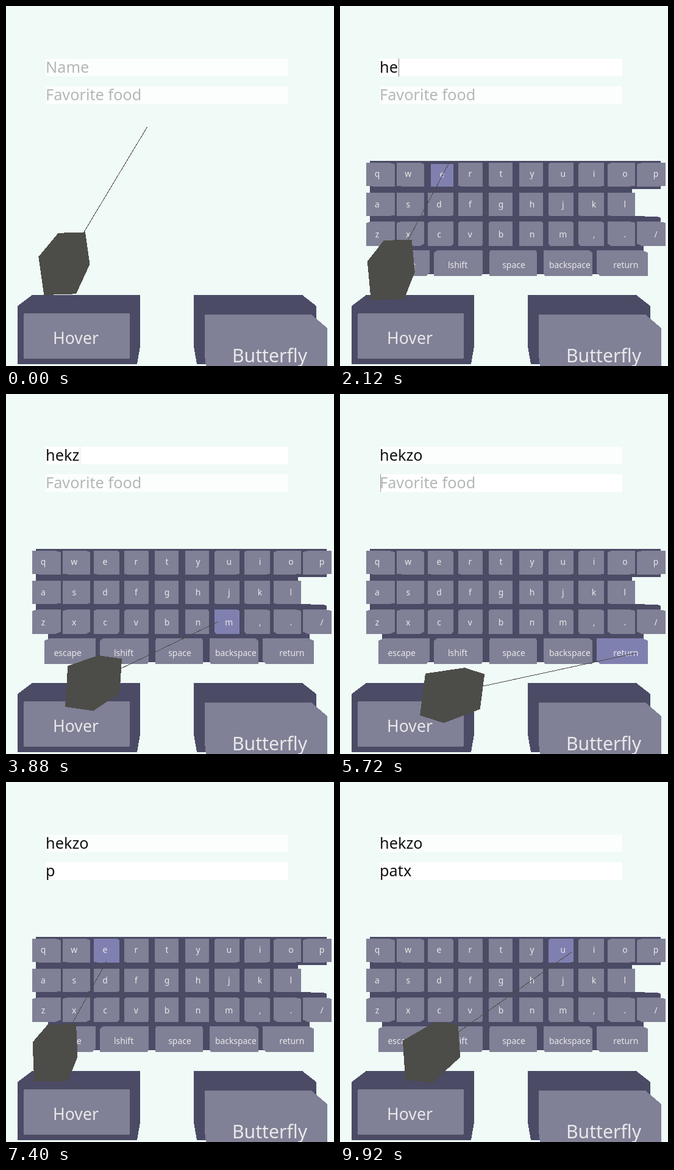
Write an HTML page that moves like this. It is 538 px wide and 588 px high and loops after 10 s.

```html
<!DOCTYPE html>
<html lang="en">
<head>
<meta charset="utf-8">
<title>Laser pointer keyboard</title>
<style>
html, body { margin: 0; width: 100%; height: 100%; overflow: hidden; background: #f0faf7; }
svg { display: block; }
text { font-family: "Noto Sans", "Open Sans", sans-serif; }
</style>
</head>
<body>
<svg id="stage" width="538" height="588" viewBox="0 0 538 588" shape-rendering="crispEdges"></svg>
<script>
const LOOP = 10000, DARK = '#4b4b66', KEY = '#808096', HOVER = '#8080b0', LABEL = '#e8e8ea', TOOL = '#4c4c48';
const stage = document.getElementById('stage');

function add(tag, attrs, parent = stage, content = '') {
  const el = document.createElementNS('http://www.w3.org/2000/svg', tag);
  set(el, attrs);
  el.textContent = content;
  parent.appendChild(el);
  return el;
}
function set(el, attrs) {
  for (const name in attrs) el.setAttribute(name, attrs[name]);
}
const label = (x, y, size, content, parent) =>
  add('text', { x, y, 'font-size': size, fill: LABEL, 'text-anchor': 'middle' }, parent, content);
const toPoints = corners => corners.map(([x, y]) => `${x.toFixed(1)},${y.toFixed(1)}`).join(' ');

// Outline of a solid seen from the front: the convex hull of its corners
function hull(corners) {
  const sorted = [...corners].sort((a, b) => a[0] - b[0] || a[1] - b[1]);
  const turn = (o, a, b) => (a[0] - o[0]) * (b[1] - o[1]) - (a[1] - o[1]) * (b[0] - o[0]);
  const chain = list => {
    const out = [];
    for (const p of list) {
      while (out.length > 1 && turn(out[out.length - 2], out[out.length - 1], p) <= 0) out.pop();
      out.push(p);
    }
    return out.slice(0, -1);
  };
  return [...chain(sorted), ...chain(sorted.reverse())];
}

// Text fields; each letter of a word appears at its time
const fields = [
  { hint: 'Name', y: 86, focus: 520, word: 'hekzo', times: [1580, 2080, 2680, 3520, 4480] },
  { hint: 'Favorite food', y: 131, focus: 5640, word: 'patx', times: [6560, 7860, 8560, 9130] }
];
for (const field of fields) {
  field.box = add('rect', { x: 65, y: field.y, width: 398, height: 29, fill: '#fff' });
  field.text = add('text', { x: 65, y: field.y + 23, 'font-size': 25.3 });
}
const cursor = add('rect', { width: 1, height: 29, fill: '#222' });

// Keyboard: every key is a shallow box, its base shrunk toward the vanishing point
const VANISH = [286, 306], BASE = 0.96, TEXT = 1.01;
const project = (point, scale) => point.map((v, i) => VANISH[i] + (v - VANISH[i]) * scale);
const keyboard = add('g', {});
add('path', { fill: DARK, d: 'M49 253H526V299H479V343L520 344L526 346V392H498V438H69V392H49Z' }, keyboard);
const keys = {};

function addRow(row, names, left, pitch, width) {
  const top = 256 + 49 * row, height = 38;
  names.forEach((name, i) => {
    const x = left + pitch * i;
    const front = [[x, top], [x + width, top], [x + width, top + height], [x, top + height]];
    const base = front.map(p => project(p, BASE));
    const all = [...front, ...base];
    const xs = all.map(p => p[0]), ys = all.map(p => p[1]);
    const key = {
      center: [x + width / 2, top + height / 2],
      low: [Math.min(...xs), Math.min(...ys)],
      high: [Math.max(...xs), Math.max(...ys)],
      raised: toPoints(hull(all)),
      pressed: toPoints(base)
    };
    key.middle = key.low.map((v, k) => (v + key.high[k]) / 2);
    key.face = add('polygon', {}, keyboard);
    key.text = label(0, 0, 13.9, name, keyboard);
    keys[name] = key;
  });
}
addRow(0, [...'qwertyuiop'], 43, 50.3, 38.3);
addRow(1, [...'asdfghjkl'], 43, 50.3, 38.3);
addRow(2, [...'zxcvbnm,./'], 43, 50.3, 38.3);
addRow(3, ['escape', 'lshift', 'space', 'backspace', 'return'], 63, 91, 78);

// Large buttons
add('path', { fill: DARK, d: 'M43 472H220V556L215 585H19V490Z' });
add('rect', { x: 29, y: 502, width: 174, height: 74, rx: 2, fill: KEY });
label(114.5, 552, 26.6, 'Hover');
add('path', { fill: DARK, d: 'M308 472H486L509 490V585H313L308 556Z' });
add('path', { fill: KEY, d: 'M326 504H501L527 526V588H328L326 570Z' });
label(432.5, 582, 30.2, 'Butterfly');

const laser = add('line', { stroke: TOOL, 'stroke-width': 1 });
const controller = add('polygon', { fill: TOOL });

// The laser's route: arrival time, place, optional offset from its middle
const DWELL = 200;
const places = { rest: [215, 225], nameField: [190, 125] };
const route = [
  [-140, 'rest'], [320, 'nameField'], [1160, 'space', 28, 6], [1480, 'n'], [2040, 'e', 13, -17],
  [2600, 'v'], [3340, 'y'], [3880, 'm', -15], [4400, 'n'], [5160, 'return', -22, 16],
  [5560, 'return', 23, 3], [6440, 'p'], [7400, 'e', 0, 18], [7760, 'a'], [8400, 't', -15, -8],
  [9040, 'x'], [9640, 'u'], [9920, 'u', 18, 2]
].map(([time, name, dx = 0, dy = 0]) => {
  const [x, y] = places[name] || keys[name].middle;
  return { time, x: x + dx, y: y + dy };
});

function aimAt(t) {
  const next = route.findIndex(stop => stop.time > t);
  if (next < 0) return route[route.length - 1];
  const from = route[next - 1], to = route[next];
  const leave = Math.min(from.time + DWELL, to.time - 80);
  const u = Math.max(0, (t - leave) / (to.time - leave));
  const ease = u * u * (3 - 2 * u);
  return { x: from.x + (to.x - from.x) * ease, y: from.y + (to.y - from.y) * ease };
}

// The controller is a box that swings with the aim (p, q measured from the panel's middle)
function drawController({ x, y }) {
  const p = (x - 250) / 100, q = (y - 280) / 100;
  const near = [95 + 26 * p - p * p + 3 * q, 455 + 2 * p + 26 * q];
  const far = [128 + 40 * p - 2 * p * p + 4 * q, 419 + 2 * p + 40 * q];
  const across = [51 - 5 * p, 1 + 3 * p + 3 * q];
  const up = [9 * q - 4, -64 - 3 * q];
  const face = (center, size) => [[-1, -1], [1, -1], [1, 1], [-1, 1]].map(([a, b]) =>
    center.map((v, i) => v + size * (a * across[i] + b * up[i]) / 2));
  controller.setAttribute('points', toPoints(hull([...face(near, 1), ...face(far, 0.84)])));

  const reach = y < 250 ? 1.16 : 1; // the beam goes on past the panel
  set(laser, {
    x1: far[0], y1: far[1],
    x2: far[0] + (x - far[0]) * reach, y2: far[1] + (y - far[1]) * reach
  });
}

function drawFields(t) {
  const active = fields.filter(f => t >= f.focus).pop();
  let last = -LOOP;
  for (const field of fields) {
    const typed = field.word.slice(0, field.times.filter(time => time <= t).length);
    field.box.setAttribute('fill-opacity', field === active ? 1 : 0.75);
    field.text.textContent = typed || field.hint;
    field.text.setAttribute('fill', typed ? '#111' : '#b3b8b5');
    if (field !== active) continue;
    last = [field.focus, ...field.times].filter(time => time <= t).pop();
    const glow = 0.5 + 0.5 * Math.cos(2 * Math.PI * (t - last) / 560);
    const width = typed ? field.text.getComputedTextLength() : 0;
    set(cursor, { x: Math.round(66 + width), y: field.y, opacity: 0.6 * glow });
  }
  cursor.setAttribute('visibility', active ? 'visible' : 'hidden');
  return t - last;
}

function draw(t) {
  const aim = aimAt(t), sincePress = drawFields(t);
  keyboard.setAttribute('visibility', t >= fields[0].focus ? 'visible' : 'hidden');
  for (const key of Object.values(keys)) {
    const over = [aim.x, aim.y].every((v, i) => v >= key.low[i] && v <= key.high[i]);
    const down = over && sincePress < 80;
    const [x, y] = project(key.center, down ? TEXT - 0.04 : TEXT);
    set(key.face, { fill: over ? HOVER : KEY, points: down ? key.pressed : key.raised });
    set(key.text, { x: x + 1, y: y + 4.5 });
  }
  drawController(aim);
}

const start = performance.now();
function tick(now) {
  const t = Math.max(0, now - start) % LOOP;
  draw(Math.floor(t / 40) * 40);
  requestAnimationFrame(tick);
}
draw(0);
requestAnimationFrame(tick);
</script>
</body>
</html>
```
